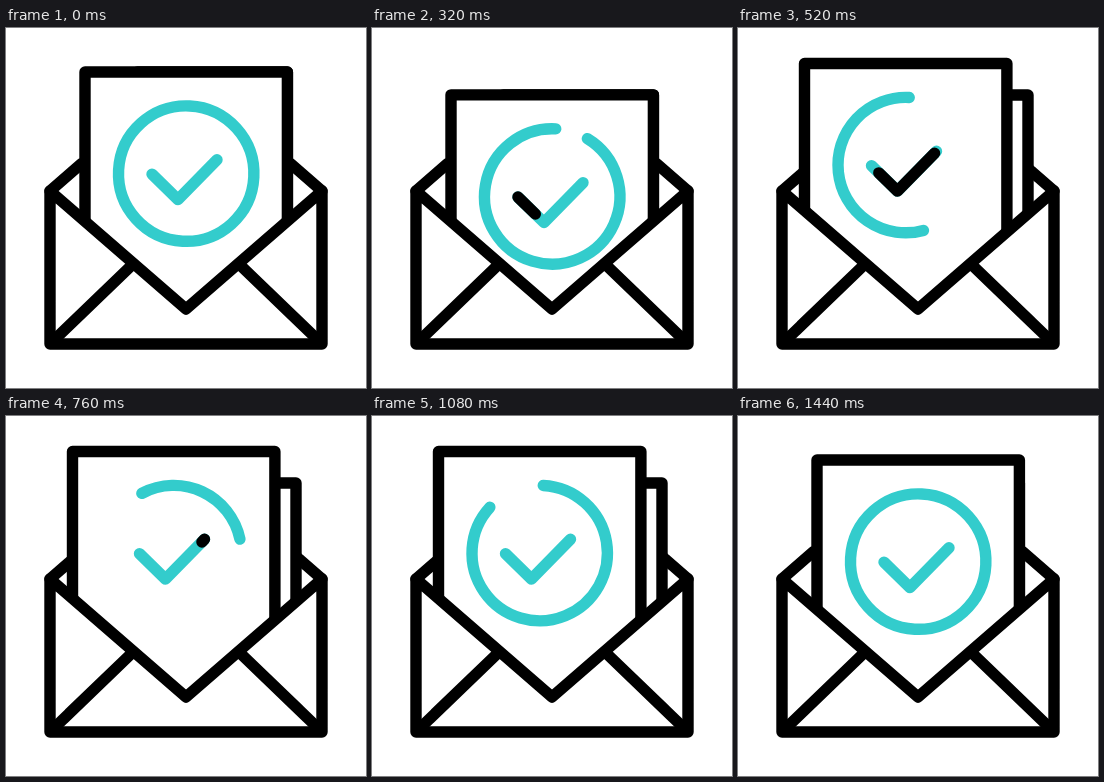
Write an HTML page that moves like this. It is 360 by 360 pixels and loops after 1480 ms.

```html
<!DOCTYPE html>
<html lang="en">
<head>
<meta charset="utf-8">
<title>Letter approved</title>
<style>
  html, body { margin: 0; width: 100%; height: 100%; overflow: hidden; background: #fff; }
  svg { display: block; width: 100vw; height: 100vh; }
  path { stroke: #000; stroke-width: 11.4; stroke-linecap: round; stroke-linejoin: round; fill: none; }
  .solid { fill: #fff; }
  .teal { stroke: #33cccc; }
</style>
</head>
<body>
<svg viewBox="0 0 360 360">
  <path d="M44 163L75 136M316 163L285 136"/>
  <path id="back" class="solid"/>
  <path id="front" class="solid"/>
  <g id="mark">
    <path id="ring" class="teal"/>
    <path class="teal" d="M146 146.2L172 171.6L211 131.8"/>
    <path id="ink" pathLength="1" d="M146 146.2L172 171.6L211 131.8"/>
  </g>
  <path class="solid" d="M44 163L180 281L316 163V316H44Z"/>
  <path d="M46 314L126 237M314 314L234 237"/>
</svg>
<script>
  const LOOP = 1480, STEP = 40, HOLD = 120;
  const LEFT = 79, RIGHT = 281.4, TOP = 44;
  const DIP = 23, SHIFT_X = -12.5, SHIFT_Y = -8.5;
  const CX = 180.2, CY = 145.6, R = 67.7, START = -87;
  const el = id => document.getElementById(id);
  const back = el('back'), front = el('front'), mark = el('mark');
  const ring = el('ring'), ink = el('ink');

  // Eased progress of t between two times
  function ease(t, from, to) {
    const p = Math.min(1, Math.max(0, (t - from) / (to - from)));
    return p * p * (3 - 2 * p);
  }

  const mix = (a, b, p) => a + (b - a) * p;

  const sheet = (left, right, top) => `M${left} 300V${top}H${right}V300`;

  function point(deg) {
    const a = deg * Math.PI / 180;
    return `${CX + R * Math.cos(a)} ${CY + R * Math.sin(a)}`;
  }

  // Two halves, so a full turn works as well
  function arc(from, to) {
    const half = (to - from) / 2;
    const large = half > 180 ? 1 : 0;
    const part = deg => `A${R} ${R} 0 ${large} 1 ${point(deg)}`;
    return `M${point(from)}${part(from + half)}${part(to)}`;
  }

  function draw(t) {
    const down = ease(t, 100, 330);
    const out = ease(t, 330, 480);
    const home = ease(t, 1090, 1360);
    const dx = SHIFT_X * out * (1 - home);
    const dy = mix(mix(DIP * down, SHIFT_Y, out), 0, home);
    const right = RIGHT + dx;
    front.setAttribute('d', sheet(LEFT + dx, right, TOP + dy));
    mark.setAttribute('transform', `translate(${dx} ${dy})`);

    // The rear sheet stays low, then tucks in behind the front one
    const tuck = ease(t, 1090, 1230);
    const rear = mix(RIGHT + 8.6 * out, right, tuck);
    back.setAttribute('d', sheet(rear - 150, rear, TOP + DIP * down));

    const tail = START + 360 * ease(t, 203, 883);
    const head = START + 360 + 360 * ease(t, 560, 1240);
    ring.setAttribute('d', arc(tail, head));

    const end = ease(t, 200, 557), begin = ease(t, 446, 803);
    const length = end - begin;
    ink.style.display = length > 0.001 ? '' : 'none';
    ink.setAttribute('stroke-dasharray', `${Math.max(length, 0)} 3`);
    ink.setAttribute('stroke-dashoffset', -begin);
  }

  const origin = performance.now();

  function tick() {
    const t = (performance.now() - origin) % LOOP;
    draw(t < HOLD ? 0 : Math.floor(t / STEP) * STEP);
    requestAnimationFrame(tick);
  }

  tick();
</script>
</body>
</html>
```
